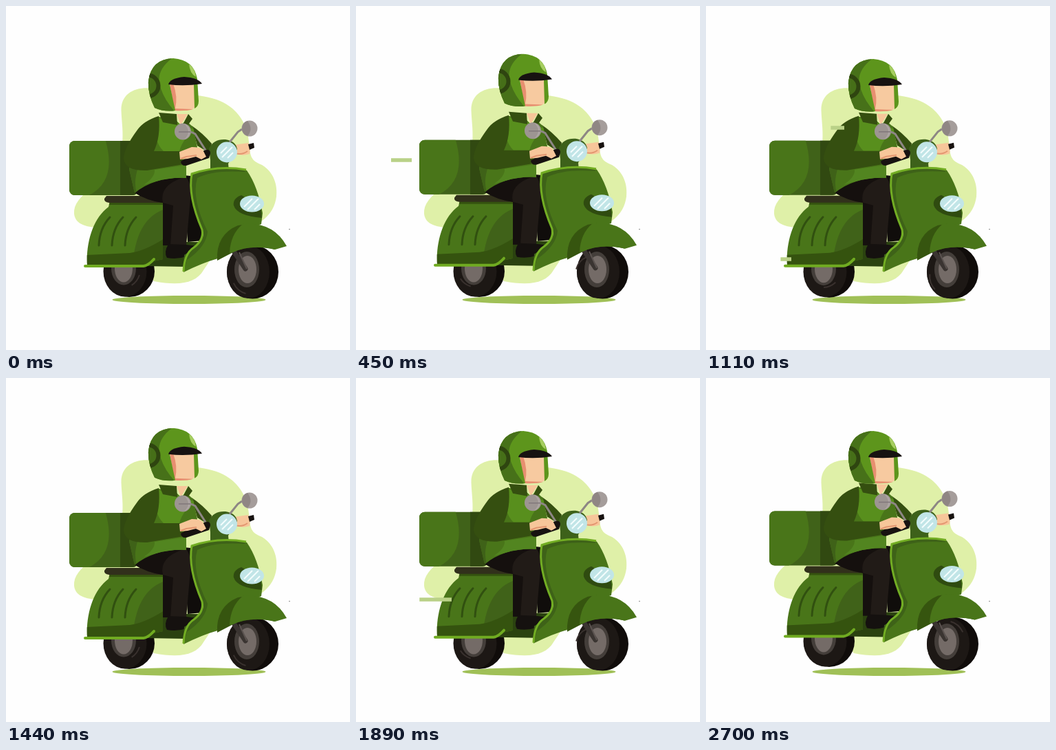
Write an HTML page that moves like this. It is 500 by 500 pixels and loops after 2.73 s.

```html
<!DOCTYPE html>
<html lang="en">
<head>
<meta charset="utf-8">
<title>Scooter courier</title>
<style>
  html, body { margin: 0; height: 100%; overflow: hidden; background: #fefefe; }
  svg { display: block; width: 100vw; height: 100vh; }
</style>
</head>
<body>
<svg viewBox="0 0 500 500" fill="none">
  <defs>
    <clipPath id="boxClip"><rect x="92" y="196" width="100" height="79" rx="8"/></clipPath>
    <clipPath id="rearClip"><path d="M118 377C116 343 127 308 149 292L151 284H228V368L214 371L206 378Z"/></clipPath>
    <clipPath id="helmetClip"><path d="M216 148Q206 128 207 109Q211 77 243 76Q273 78 278 106L280 138Q280 146 274 149L273 114H238L246 152Q229 154 216 148Z"/></clipPath>
    <clipPath id="torsoClip"><path d="M222 161L247 166L254 173L262 167L272 176L278 205L262 232V250Q216 248 187 272L179 237L196 180Z"/></clipPath>
    <clipPath id="lampClip"><circle cx="321" cy="212.500" r="15"/></clipPath>
    <clipPath id="lowLampClip"><ellipse cx="357.500" cy="287.500" rx="17.500" ry="12"/></clipPath>
  </defs>

  <!-- backdrop -->
  <path fill="#dff0a8" d="M167.500 152C167 128 186 118 209 119.500C240 132 275 125 306 136C334 146 348 167 352 190C356 216 352 223 372 231C389 241 395 260 393 277C389 306 369 316 340 330C309 346 303 361 287 384C276 403 252 407 215 400L150 322C125 323 101 321 99 302C98 288 108 277 125 264C181 224 169 189 167.500 152Z"/>
  <ellipse cx="266" cy="427" rx="111.500" ry="6" fill="#a0c057"/>
  <circle cx="412" cy="324.500" r=".8" fill="#777"/>

  <!-- rear wheel -->
  <g id="rearWheel">
    <ellipse cx="179" cy="386" rx="37" ry="37.500" fill="#100c0a"/>
    <ellipse cx="173" cy="386" rx="31.500" ry="37" fill="#1d1815"/>
    <ellipse cx="171" cy="382" rx="18" ry="24" fill="#443e3a"/>
    <ellipse cx="171" cy="382" rx="13" ry="20" fill="#746b67"/>
    <path id="rearGlint" d="M194 391Q191 401 183 406" stroke="#39312e" stroke-width="2"/>
  </g>

  <!-- front wheel -->
  <ellipse cx="358.500" cy="386.500" rx="37.500" ry="39" fill="#100c0a"/>
  <ellipse cx="352" cy="386.500" rx="31" ry="38.500" fill="#1d1815"/>
  <ellipse cx="350" cy="383" rx="18" ry="26" fill="#443e3a"/>
  <ellipse cx="351" cy="383" rx="13" ry="20" fill="#746b67"/>
  <path id="frontGlint" d="M331 403Q337 415 349 418" stroke="#39312e" stroke-width="2"/>

  <g id="bike">
    <path d="M332 358L348 382" stroke="#3a3431" stroke-width="7" stroke-linecap="round"/>
    <path d="M339 358L350 382" stroke="#5b5350" stroke-width="2"/>

    <!-- delivery box -->
    <g clip-path="url(#boxClip)">
      <path fill="#406219" d="M90 190H195V280H90Z"/>
      <path fill="#497519" d="M90 190H143Q164 254 119 276H90Z"/>
      <path fill="#314911" d="M166 190H195V280H166Z"/>
    </g>

    <!-- footboard and rear body -->
    <path fill="#2b4210" d="M202 370L228 343H285V362L262 379L202 378Z"/>
    <g clip-path="url(#rearClip)">
      <path fill="#497519" d="M110 280H235V380H110Z"/>
      <path fill="#406219" d="M184 380Q188 306 235 294V380Z"/>
      <path fill="#35530f" d="M150 283H230V289H149ZM116 362L180 359Q202 356 230 338V380H116Z"/>
    </g>
    <path d="M151 307Q136 323 135 348M170 307Q155 323 154 348M189 307Q174 323 173 348" stroke="#315010" stroke-width="3" stroke-linecap="round"/>
    <path d="M115 378H200Q207 377 215 368" stroke="#70ab21" stroke-width="4" stroke-linecap="round"/>
    <path fill="#31301b" d="M146 276H228V286H150Q142 285 143 280Z"/>

    <!-- legs -->
    <path fill="#100d0b" d="M258 246L268 247L286 320V341L264 343Z"/>
    <path fill="#211b17" d="M186 271Q214 249 262 249Q270 258 268 280L262 348H228V286Q205 283 186 271Z"/>
    <path fill="#15100e" d="M186 271Q214 249 258 249Q222 261 228 286Q205 283 186 271ZM228 286L243 290L239 348H228Z"/>
    <path fill="#15110f" d="M236 346L262 347L279 349Q273 357 262 364Q248 369 234 366Q229 358 236 346Z"/>

    <!-- far arm -->
    <path fill="#354f10" d="M270 174Q285 184 299 200L296 214L278 203Z"/>
    <path fill="#f7c69a" d="M331 202L352 199L355 206L354 215Q342 219 333 214Z"/>
    <path d="M333 214Q343 217 351 211" stroke="#e39670" stroke-width="2"/>
    <path fill="#171210" d="M352 201L360 199L361 206L354 209Z"/>

    <!-- torso -->
    <g clip-path="url(#torsoClip)">
      <path fill="#497519" d="M175 155H285V280H175Z"/>
      <path fill="#588f1d" d="M214 160Q214 197 229 211H252Q258 189 278 181L254 172Z"/>
      <path fill="#528520" d="M216 238Q236 235 262 231V252Q230 250 200 260Q217 249 216 238Z"/>
      <path fill="#3f6218" d="M175 235H192Q185 255 190 272H175Z"/>
    </g>
    <path fill="#f7c69a" d="M248 157H264L254 173Z"/>
    <path fill="#354f10" d="M222 155L248 157L249 173L228 169ZM257 172L265 157L271 164L263 175Z"/>
    <path fill="#354f10" d="M222 160Q200 167 191 180Q171 207 171 222Q173 240 205 239L258 230L255 211L215 211Q225 190 222 160Z"/>

    <!-- steering head -->
    <path fill="#3d611a" d="M295 207Q302 193 319 194Q334 196 336 208L323 229L324 240H297V224Z"/>
    <path d="M269 183L275 186L291 211M343 179L337 183L325 198" stroke="#8d8684" stroke-width="3"/>
    <circle cx="257" cy="182.500" r="12" fill="#9d9592"/>
    <path fill="#aea6a4" d="M259 171A12 12 0 0 1 259 194Q271 183 259 171Z"/>
    <path d="M251 183H268" stroke="#80777a" stroke-width="1.500"/>
    <circle cx="354" cy="178" r="11.500" fill="#a59d9b"/>
    <path fill="#8f8684" d="M351 167A11.500 11.500 0 0 0 351 189Q360 179 351 167Z"/>

    <!-- near hand -->
    <path fill="#171210" d="M254 226L262 221L288 210Q297 207 297 214L295 221L262 232Q255 233 254 226Z"/>
    <path fill="#f7c69a" d="M252 212L270 205Q282 205 286 209L291 219L284 223L276 219L264 222L253 223Z"/>
    <path d="M254 222L262 219L277 217" stroke="#e39670" stroke-width="2"/>

    <!-- front shield -->
    <path fill="#497519" d="M270 243Q310 231 350 239Q366 262 373 301L371 317L330 333L308 367Q286 373 258 387L259 362Q286 346 287 331Q265 282 270 243Z"/>
    <path fill="#3e6218" d="M270 243Q310 231 350 239L347 241Q300 238 278 250Q269 280 293 328Q291 350 263 369L258 386L259 362Q286 346 287 331Q265 282 270 243Z"/>
    <path d="M349 238Q308 231 270 244Q264 276 285 325Q288 340 273 351Q259 360 258 386" stroke="#72ad23" stroke-width="3"/>
    <path fill="#2f4b10" d="M342 275Q329 280 331 290Q336 305 372 308L370 290Z"/>
    <ellipse cx="357.500" cy="287.500" rx="17.500" ry="12" fill="#c1e5e7"/>
    <path clip-path="url(#lowLampClip)" d="M346 292L358 280M351 296L367 280M361 296L369 288" stroke="#f4fdfd" stroke-width="2"/>

    <!-- fender -->
    <path fill="#36550f" d="M307 370Q305 332 337 319L350 317L391 354Q356 346 330 358Z"/>
    <path fill="#497519" d="M325 359Q326 332 344 317Q388 313 408 349L391 354Q356 346 330 358Z"/>

    <!-- headlamp -->
    <circle cx="321" cy="212.500" r="15" fill="#c1e5e7"/>
    <path clip-path="url(#lampClip)" d="M312 214L321 205M314 220L329 205M322 221L330 213" stroke="#f4fdfd" stroke-width="2"/>
  </g>

  <!-- head -->
  <g id="head">
    <path fill="#f7caa0" d="M238 113H275V147Q270 153 245 152Z"/>
    <path fill="#e78f70" d="M238 113H243Q250 132 246 149L272 150Q262 153 245 152Z"/>
    <g clip-path="url(#helmetClip)">
      <path fill="#5d951c" d="M200 70H285V155H200Z"/>
      <path fill="#477119" d="M200 70H250Q214 92 225 120Q231 138 247 155H200Z"/>
      <circle cx="206" cy="116" r="15.500" fill="#466f18" stroke="#2f4510" stroke-width="6"/>
      <path fill="#a6ce60" d="M266 84Q275 91 276 103Q267 98 266 84Z"/>
    </g>
    <path fill="#171211" d="M236 114Q238 105 259 103Q279 104 285 113Q260 117 236 114Z"/>
  </g>

  <g id="streaks" stroke="#b9d187" stroke-width="5.500"></g>
</svg>
<script>
  const LOOP = 2730, BOB = 360;
  const get = id => document.getElementById(id);

  // Speed lines: start time, right end, left end, height
  const streaks = [[235, 118, 51, 224], [1035, 201, 138, 177], [1035, 124, 74, 368], [1760, 141, 74, 322]];
  const STREAK_TIME = 310;
  const streakLines = streaks.map(() =>
    get('streaks').appendChild(document.createElementNS('http://www.w3.org/2000/svg', 'path')));

  // Helmet hops: time, top edge
  const hops = [[0, 76], [180, 77], [450, 69.5], [660, 77], [990, 72], [1110, 77], [1320, 77], [1530, 70],
    [1710, 77], [1890, 77], [2070, 72], [2220, 77], [2460, 73], [2700, 77], [2730, 77]];

  const clamp = v => Math.max(0, Math.min(1, v));
  const ease = v => (1 - Math.cos(Math.PI * clamp(v))) / 2;
  const wave = t => Math.cos(2 * Math.PI * t / BOB);
  const shift = (id, y) => get(id).setAttribute('transform', `translate(0 ${y})`);
  const spin = (id, angle, x, y) => get(id).setAttribute('transform', `rotate(${angle} ${x} ${y})`);

  function helmetTop(t) {
    const i = hops.findIndex(([time]) => time > t);
    const [t0, y0] = hops[i - 1], [t1, y1] = hops[i];
    return y0 + (y1 - y0) * ease((t - t0) / (t1 - t0));
  }

  function draw(t) {
    shift('bike', 1.25 * (wave(t) - 1));
    shift('rearWheel', 2.2 * (wave(t - BOB / 8) - 0.9));
    shift('head', helmetTop(t) - 76);
    spin('rearGlint', t / BOB * 360, 172, 386);
    spin('frontGlint', t / BOB * 360, 352, 386);

    streaks.forEach(([start, right, left, y], i) => {
      const p = (t - start) / STREAK_TIME;
      const at = v => right + (left - right) * ease(v);
      const head = at(p / 0.65), tail = at((p - 0.35) / 0.65);
      streakLines[i].setAttribute('d', p > 0 && p < 1 ? `M${head} ${y}H${tail}` : '');
    });
  }

  function tick() {
    draw(performance.now() % LOOP);
    requestAnimationFrame(tick);
  }
  tick();
</script>
</body>
</html>
```
